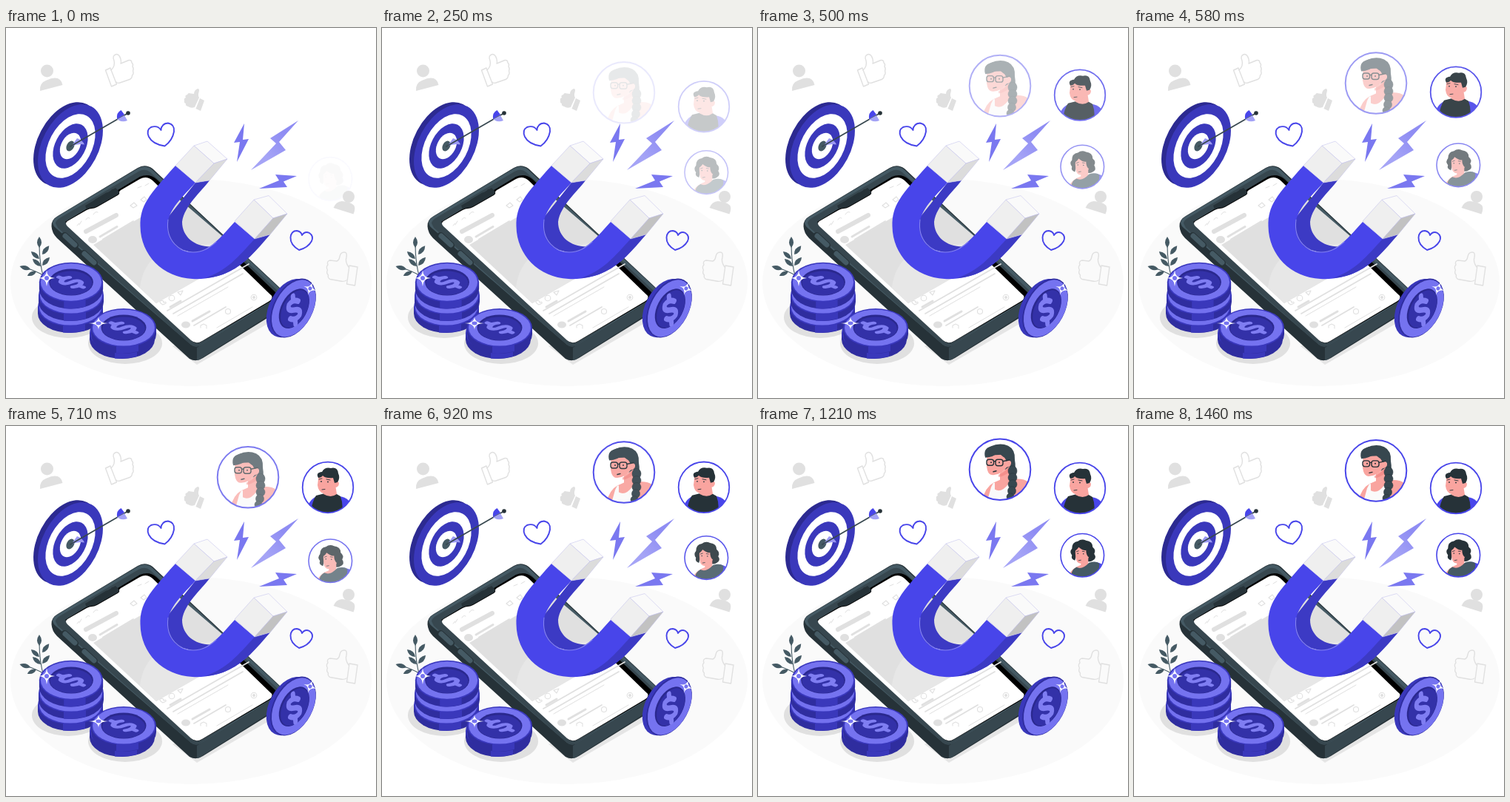
These frames come from a looping animation (500x500 px, 1500 ms). An HTML page:

```html
<!DOCTYPE html>
<html lang="en">
<head>
<meta charset="utf-8">
<title>Magnet</title>
<style>
  html, body { margin: 0; width: 100%; height: 100%; overflow: hidden; background: #fff; }
  svg { display: block; width: 100vw; height: 100vh; }
  .line { fill: none; stroke-linecap: round; stroke-linejoin: round; }
  .pale { fill: #e0e0e0; }
  .main { fill: #4845ea; }
  .skin { fill: #f9a49f; }
  .dark { fill: #263238; }
</style>
</head>
<body>
<svg viewBox="0 0 500 500">
  <defs>
    <path id="dollar" class="line" stroke="#7f7df2" stroke-width="5.6"
      d="M6-7Q0-12-6-8Q-9-2 0 0Q9 2 6 8Q0 12-6 7M0-15V-11M0 11V15"/>
    <g id="side">
      <path fill="#2f2d9f" d="M-44 0V9A44 26 0 0 0 44 9V0Z"/>
      <path fill="#3a38bb" d="M-10 25V34.500Q4 36 20 32V23Z"/>
      <ellipse rx="44" ry="26" fill="#3a38bd"/>
      <ellipse rx="42" ry="24.500" fill="#7371ef"/>
    </g>
    <g id="coin">
      <use href="#side"/>
      <ellipse rx="41" ry="24" fill="#7573f0"/>
      <ellipse rx="30.500" ry="17.500" fill="#2a288f"/>
      <ellipse cy="1.200" rx="29" ry="15.800" fill="#3331a8"/>
      <use href="#dollar" transform="matrix(.84 -.54 1.1 .44 0 0)"/>
    </g>
    <path id="star" fill="#fff" d="M0-11Q.3-.3 11 0Q.3.3 0 11Q-.3.3-11 0Q-.3-.3 0-11ZM0-3A3 3 0 0 0 0 3A3 3 0 0 0 0-3Z"/>
    <path id="leaf" fill="#455a64" d="M0 0Q-6-7 0-15Q6-7 0 0Z"/>
    <linearGradient id="glow" x1="1" y1="0" x2="0" y2="1">
      <stop offset=".3" stop-color="#8f8df3"/><stop offset=".7" stop-color="#a5a4f6"/>
    </linearGradient>
    <clipPath id="clipA"><circle r="41"/></clipPath>
    <clipPath id="clipB"><circle r="34"/></clipPath>
    <clipPath id="clipC"><circle r="29"/></clipPath>
  </defs>

  <rect width="500" height="500" fill="#fff"/>
  <ellipse cx="250" cy="344" rx="244" ry="140" fill="#fafafa"/>

  <!-- faint icons -->
  <g class="pale">
    <circle cx="55.500" cy="58" r="8.500"/>
    <path d="M46 85Q45 74 55 70.500Q67 65 73 70Q76 73 76.500 77Z"/>
    <path d="M241 98Q240 95 243 94Q241 91 245 90Q246 87 250 88.500L254 89Q254 84 259 82Q262 82 260.500 87Q259 91 261 94L255 107Q250 109 246 106Q242 105 243 102Q240 101 241 98Z"/>
    <path d="M262 95L268 98L263 112L256.500 109Z"/>
  </g>
  <g class="line" stroke="#e0e0e0" stroke-width="1.400">
    <path d="M134.500 57L141 54L149.500 76L142.500 79Z"/>
    <path d="M142 57Q148 51 146 44Q143 37 149 35.500Q153 35 155 42Q156 46 155 48L166 43.500Q170 43 170 47Q172.500 49 171 52Q173 55 171.500 58Q173 62 170.500 64Q170.500 68 167 69.500L154 74Q150 75 149 73"/>
    <path d="M464 321L475 323L471.500 348L460.500 346Z"/>
    <path d="M463 323Q458 316 460 310Q461.500 303 457 303Q452 303 451 309Q450 314 447 315L438 314Q433 315 435 320Q432 323 434.500 327Q432.500 331 435.500 334Q434.500 338 438 339.500L452 342Q457 343 460 341"/>
  </g>
  <g class="line" stroke="#4845ea" stroke-width="1.900">
    <path d="M214.500 159.500Q198 157 193 147Q189 138 196 134Q205 131 209.500 138Q210 129 219 128.500Q228 130 227 140Q225 152 214.500 159.500Z"/>
    <path d="M396 300Q384 293 384.500 283Q385.500 274 393 274Q399 275 400 280Q404 274 410 277Q416 281 413 288Q408 297 396 300Z"/>
  </g>

  <!-- ground shadows -->
  <g class="pale">
    <ellipse cx="84" cy="391" rx="49" ry="28"/>
    <ellipse cx="161" cy="426" rx="50" ry="28"/>
    <path d="M225 430L258 455L360 396L330 370Z" opacity=".8"/>
  </g>

  <!-- phone -->
  <path class="dark" d="M61.500 268Q61 259 70 254L178 189Q188 183 198 190L370 351Q379 359 374 366V379L266 446Q257 452 248 447L69 284Q62 277 61.500 268Z"/>
  <path fill="#455a64" d="M63 264Q63 258 71 254L178 190Q188 184 197 191L369 351Q377 358 368 364L265 428Q257 433 250 428L68 271Q64 268 63 264Z"/>
  <path fill="#37474f" d="M67 264Q67 260 74 256L179 194Q188 189 195 195L365 353Q372 359 365 364L264 428Q257 433 250 428L70 270Z"/>
  <path fill="#37474f" d="M258 432L372 362V378L266 445Q262 449 258 449Z"/>
  <path fill="#000" d="M80 262L181 201Q193 196 203 204L363 356Q370 362 362 367L264 424Q257 428 250 422Z"/>
  <path fill="#fff" d="M83 261L109 246Q113 244 116 244Q119 244 123 242L151 226Q154 224 153 222Q153 220 157 218L181 204Q190 199 198 206L356 359Q363 364 356 369L265 423Q257 428 250 422L83 268Q79 264 83 261Z"/>
  <path fill="#263238" d="M109 245Q113 243 116 243Q119 243 123 241L151 225Q154 223 152 220L148 216L107 240Z"/>
  <g class="line" stroke="#263238">
    <path stroke-width="3.200" d="M121 233L136 224"/><path stroke-width="3.600" d="M144 219.500V219.500"/>
    <path stroke-width="10" d="M79 281L93 294M105 305L119 318"/>
    <path stroke="#455a64" stroke-width="7" d="M80 281L93 293M106 305L119 317"/>
  </g>
  <path class="pale" d="M118 293L230 228L320 305L203 372Z"/>
  <path fill="#e7e7e7" d="M181 351Q185 315 215 300L300 288L320 305L203 372Z"/>
  <g class="line" stroke="#e0e0e0">
    <path stroke-width="6" d="M108 275L149 253"/>
    <path stroke-width="3" d="M127 282L150 268.500M222 377L236 369M252 396L275 383"/>
    <path stroke-width="1.800" d="M131 285.500L172 261M218 382L328 319M226 386L320 332M254 402L297 377"/>
    <path stroke-width="1" d="M232 389L300 350M285 405L333 377M96 267L98 265L98.500 264M99 266L102 261M108 259Q110 255 113 257M118 252Q121 247 124 249M178 216L183 214M188 213L193 210"/>
    <path stroke-width="1.100" d="M168 240L173 236L177 240L172 243ZM182 232L187 228L190 232L186 235ZM212 374Q205 370 210 368Q213 368 213 371Q217 369 216 372ZM232 357L239 355L236 361ZM263 405V402L267 400L271 402V406"/>
    <circle cx="224" cy="365" r="3.800" stroke-width="1.100"/>
    <circle cx="300" cy="383" r="3.500" stroke-width="1.100"/>
    <circle cx="335" cy="364" r="3.800" stroke-width="1.100"/>
  </g>
  <g class="pale"><ellipse cx="117" cy="286" rx="6" ry="5"/><ellipse cx="243" cy="401" rx="6" ry="4.500"/><circle cx="335" cy="364" r="2"/></g>

  <!-- magnet -->
  <path fill="#3c3ac4" d="M256 209L275 206C265 220 241 240 238 262C238 284 258 298 283 295L262 306L224 296L214 262Z"/>
  <path class="main" d="M229 186L256 209C240 227 219 245 218 267C218 291 235 303 253 303C272 303 284 290 309 262L336 285L354 281C338 300 323 319 302 329C286 337 268 340 252 339C212 337 182 307 181.500 268C181 240 192 227 229 186Z"/>
  <path fill="#3c3ac4" d="M336 285L357 279C338 301 323 319 302 329Q287 337 268 338C298 329 314 309 336 285Z"/>
  <path class="line" stroke="#8381f2" stroke-width="1.100" d="M219 259C215 288 235 303 253 303C266 303 275 297 284 289"/>
  <g stroke="#bdbbea" stroke-width=".5">
    <path fill="#fafafa" d="M254 159L272 153L299 177L281 183Z"/>
    <path fill="#efefef" d="M254 159L281 183L256 209L229 186Z"/>
    <path fill="#dcdcdc" d="M281 183L299 177L275 206L256 209Z"/>
    <path fill="#fafafa" d="M335 232L355 226.500L380 251L361 257Z"/>
    <path fill="#efefef" d="M335 232L361 257L336 285L309 261Z"/>
    <path fill="#c2c2c2" d="M361 257L380 251L357 279L336 285Z"/>
  </g>

  <!-- target -->
  <ellipse transform="translate(81 156.500) rotate(28)" rx="38" ry="60.500" fill="#2c2a91"/>
  <g transform="translate(87 159.500) rotate(28)">
    <ellipse rx="38" ry="60.500" fill="#3a38bb"/>
    <ellipse rx="29" ry="46.500" fill="#fff"/>
    <ellipse rx="20.500" ry="32.500" fill="#3a38bb"/>
    <ellipse rx="12.500" ry="19" fill="#fff"/>
    <ellipse rx="5" ry="7.500" fill="#455a64"/>
  </g>
  <path fill="#9b99f2" d="M88 160L96 149Q103 151 106 157.500Q97 156 88 160Z"/>
  <path class="line" stroke="#37474f" stroke-width="1.700" d="M87 160L165 115"/>
  <path class="main" d="M150 123Q149 114 155.500 111L160 117Z"/>
  <path fill="#a3a2f5" d="M150 123.500L160 118L164 125Q157 128 150 123.500Z"/>
  <circle class="dark" cx="165" cy="115" r="2.800"/>

  <!-- plant -->
  <path class="line" stroke="#455a64" stroke-width="1.100" d="M51 338Q45 318 45 292M52 335Q40 328 26 324"/>
  <use href="#leaf" transform="translate(45 297)"/>
  <use href="#leaf" transform="translate(49 306) rotate(38)"/>
  <use href="#leaf" transform="translate(45 312) rotate(-48)"/>
  <use href="#leaf" transform="translate(49 321) rotate(42)"/>
  <use href="#leaf" transform="translate(47 322) rotate(-48)"/>
  <use href="#leaf" transform="translate(33 326) rotate(-75)"/>
  <use href="#leaf" transform="translate(41 329) rotate(-115) scale(.9)"/>

  <!-- coins -->
  <use href="#side" x="87" y="377"/>
  <use href="#side" x="88" y="361"/>
  <use href="#coin" transform="translate(88 343.500) scale(.98 1.030)"/>
  <use href="#side" x="157" y="412"/>
  <use href="#coin" x="159" y="405"/>
  <g transform="translate(388 378.500) rotate(28)">
    <ellipse cx="-4.500" cy="2.500" rx="27" ry="42.500" fill="#3a38bb"/>
    <ellipse rx="26.500" ry="43" fill="#2f2d9f"/>
    <ellipse cx=".8" rx="25.500" ry="41.500" fill="#7573f0"/>
    <ellipse cx="1.500" rx="17.500" ry="29" fill="#2a288f"/>
    <ellipse cx="2.500" rx="16" ry="27.500" fill="#3331a8"/>
  </g>
  <use href="#dollar" transform="translate(389.500 381) matrix(1.05 -.5 .12 1.250 0 0)"/>
  <use href="#star" x="55" y="338"/>
  <use href="#star" transform="translate(125 399) scale(1.200 .8)"/>
  <use href="#star" transform="translate(411 352) rotate(20) scale(.85)"/>

  <!-- bolts -->
  <path fill="#7a78f0" d="M322 129L308 155L316 154L312 181L328 150L320 151Z"/>
  <path fill="url(#glow)" d="M395 125L357 149L365 156L331 192L378 165L369 154Z"/>
  <path fill="#7a78f0" d="M393 200L364 198L369 206L342 217L380 215L375 207.500Z"/>

  <!-- avatars -->
  <g id="a">
    <circle r="41.300" fill="#fff"/>
    <g clip-path="url(#clipA)">
      <path fill="#37474f" d="M-20-17Q-23-28-13-31Q0-37 11-32Q21-27 20-13Q22-2 19 6L10 6L-4-18Z"/>
      <path class="skin" d="M-24 42Q-20 24-9 18L0 14V5L13-4L14 12L28 13Q38 14 42 22V42Z"/>
      <path class="skin" d="M-18-19Q-17-11-18-4L-17 1Q-15 8-9 7.500Q2 7 9-3Q16-4 15-10Q13-14 9-11L4-20Z"/>
      <path fill="#f0837f" d="M-2 7Q6 5 11-3L12 4Q4 10-2 10Z" opacity=".6"/>
      <path fill="#fafafa" d="M-17 42L-12 24L-9 18L-7 18L-7 27Q2 32 11 20L13 19L16 42Z"/>
      <path fill="#37474f" d="M-20-16Q-8-17-2-23Q4-16 11-14L14-28L-10-32Q-22-28-20-16Z"/>
      <g fill="#37474f" stroke="#263238" stroke-width=".5">
        <ellipse cx="17" cy="2" rx="6" ry="7"/><ellipse cx="17" cy="11" rx="6" ry="6"/>
        <ellipse cx="17" cy="20" rx="6" ry="6"/><ellipse cx="16" cy="29" rx="5.500" ry="6"/>
        <ellipse cx="14" cy="37" rx="5" ry="5"/>
      </g>
      <g class="line" stroke="#263238" stroke-width="1.400">
        <rect x="-18" y="-13.500" width="9.500" height="8" rx="3"/>
        <rect x="-6" y="-13.500" width="10" height="8.500" rx="3"/>
        <path d="M-8-11H-6M4-11L13-13M-5 2L-9 3"/>
      </g>
      <circle class="dark" cx="-12" cy="-9.500" r="1"/><circle class="dark" cx="-1" cy="-9.500" r="1"/>
    </g>
    <circle class="line" r="41.300" stroke="#4845ea" stroke-width="2"/>
  </g>
  <g id="b">
    <circle r="34.300" fill="#fff"/>
    <g clip-path="url(#clipB)">
      <path class="main" d="M-30 34Q-26 16-15 12H16Q30 14 34 29L28 36Z"/>
      <path class="dark" d="M-24 36Q-21 18-16 11L-6 8.500H11L17 12Q21 22 19 36Z"/>
      <path class="skin" d="M-5 2L10-4L12 9Q4 15-6 9Z"/>
      <path class="skin" d="M-13-16Q-13-9-14-3Q-13 6-6 8Q3 8 9 0Q15 0 15-6Q14-9 10-8L8-16Z"/>
      <path class="dark" d="M-13-13Q-17-20-8-21Q-4-28 4-26Q13-28 14-19Q17-13 13-7L9-6L7-13Q-3-12-7-16Q-9-13-13-13Z"/>
      <g class="line" stroke="#263238" stroke-width=".9"><path d="M-12-11L-8-12M-2-11L3-10M-8 3L-4 2.500"/></g>
      <circle class="dark" cx="-9" cy="-8" r=".9"/><circle class="dark" cx="0" cy="-7.500" r=".9"/>
    </g>
    <circle class="line" r="34.300" stroke="#4845ea" stroke-width="1.800"/>
  </g>
  <g id="c">
    <circle r="29.300" fill="#fff"/>
    <g clip-path="url(#clipC)">
      <path class="dark" d="M-10 7Q-16 5-14 0Q-18-5-14-9Q-14-18-6-19Q-1-23 5-20Q14-19 14-11Q19-7 16-2Q20 4 14 7Q9 10 4 7L-6-8Z"/>
      <path class="main" d="M17 9Q26 10 30 16L24 28Z"/>
      <path class="skin" d="M-20 30Q-15 17-2 13V8L8 3L8 12L16 30Z"/>
      <path fill="#455a64" d="M-15 30Q-16 20-8 16Q0 20 9 10Q18 7 23 11L22 30Z"/>
      <path class="skin" d="M-9-11Q-10-4-9 3Q-8 11-2 11Q6 10 9 2L8-8L2-13Z"/>
      <path class="dark" d="M-13-5Q-8-6-5-11Q1-6 5-7Q5 0 9 3L13-8L4-17L-10-16Z"/>
      <g class="line" stroke="#263238" stroke-width=".8"><path d="M-8-5L-5-6M0-5.500L3-5M-5 7L-2 6.500"/></g>
      <circle class="dark" cx="-6" cy="-2.500" r=".8"/><circle class="dark" cx="1.500" cy="-2" r=".8"/>
    </g>
    <circle class="line" r="29.300" stroke="#4845ea" stroke-width="1.600"/>
  </g>
  <g class="pale">
    <circle cx="463" cy="228" r="8"/>
    <path d="M442.500 243Q446 234.500 454 234Q466 235 470.500 240Q472.500 245 469.500 251.500Z"/>
  </g>
</svg>
<script>
const LOOP = 1500, FPS = 24, RISE = 30;

function bezier(x1, y1, x2, y2) {
  const at = (s, p, q) => 3 * (1 - s) ** 2 * s * p + 3 * (1 - s) * s * s * q + s ** 3;
  return x => {
    if (x >= 1) return 1;
    let lo = 0, hi = 1;
    for (let i = 0; i < 24; i++) {
      const mid = (lo + hi) / 2;
      if (at(mid, x1, x2) < x) lo = mid; else hi = mid;
    }
    return at(lo, y1, y2);
  };
}

const bounce = bezier(.36, -.01, .5, 1.38);
const easeOut = bezier(0, 0, .58, 1);
const avatars = [
  { id: 'a', x: 327, y: 60.7, ms: 1500, ease: bounce },
  { id: 'b', x: 435, y: 84, ms: 1000, ease: bounce },
  { id: 'c', x: 438.3, y: 174.6, ms: 1300, ease: easeOut },
].map(v => ({ ...v, el: document.getElementById(v.id) }));

function draw(now) {
  // the movement runs in steps of 1/24 s; the first pose is held for two
  const step = Math.floor(((now % LOOP) + 4) * FPS / 1000);
  const t = (step < 2 ? 0 : Math.min(step, 35)) * 1000 / FPS + 18;
  for (const { el, x, y, ms, ease } of avatars) {
    const p = ease(t / ms);
    el.setAttribute('transform', `translate(${x} ${y + RISE * (1 - p)})`);
    el.setAttribute('opacity', Math.min(1, Math.max(0, p)));
  }
}

function tick() {
  draw(performance.now());
  requestAnimationFrame(tick);
}
tick();
</script>
</body>
</html>
```
